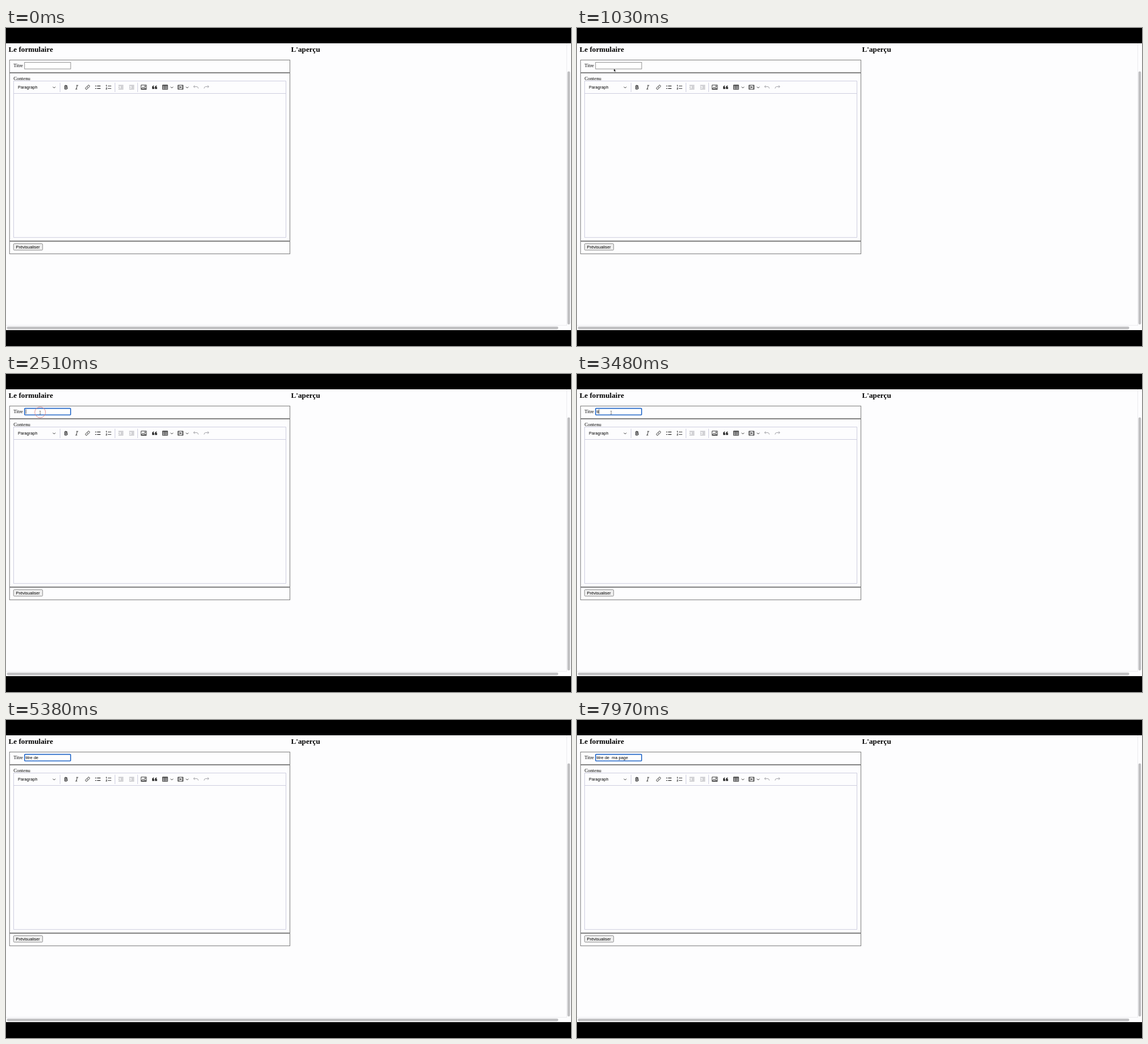
An HTML page for the animation above (8000 ms loop, 998 by 561 pixels).

```html
<!DOCTYPE html>
<html lang="fr">
<head>
<meta charset="utf-8">
<title>Formulaire</title>
<style>
  html, body { margin: 0; width: 100%; height: 100%; overflow: hidden; background: #000; }
  svg { display: block; width: 100%; height: 100%; }
  text { white-space: pre; fill: #000; }
  .serif { font: 8.8px "Liberation Serif", Times, serif; }
  .title { font: bold 13.2px "Liberation Serif", Times, serif; }
  .sans { font: 7.4px "Liberation Sans", Arial, sans-serif; }
  .box { fill: none; stroke: #858585; stroke-width: 1.1; }
  .rule { fill: none; stroke: #c9c9dc; stroke-width: .9; }
  .icon { fill: none; stroke: #2b2b2b; stroke-width: 1.7; }
  .pale { stroke: #9a9a9f; }
  .solid { fill: #2b2b2b; stroke: none; }
</style>
</head>
<body>
<svg viewBox="0 0 998 561">
  <rect width="998" height="561"/>
  <rect y="27" width="998" height="506" fill="#fdfdfe"/>

  <path d="M990.5 27V525M0 524.5H990" stroke="#ececef" fill="none"/>
  <rect x="991.7" y="76.5" width="4.6" height="446.5" rx="2.3" fill="#c0c0c2"/>
  <rect x="1.5" y="526.8" width="974" height="4.6" rx="2.3" fill="#c0c0c2"/>

  <text class="title" x="4.5" y="42">Le formulaire</text>
  <text class="title" x="503.5" y="42">L'aperçu</text>

  <rect class="box" x="6.3" y="56.5" width="495.2" height="22"/>
  <rect class="box" x="6.3" y="79.5" width="495.2" height="296"/>
  <rect class="box" x="6.3" y="376.6" width="495.2" height="21.8"/>

  <text class="serif" x="13.2" y="69">Titre</text>
  <rect id="field" x="32.8" y="60.6" width="81.4" height="11.6" fill="#fff" stroke="#858585" stroke-width=".9"/>
  <text id="typed" class="sans" x="34.6" y="68.8"></text>
  <rect id="caret" y="62.4" width=".7" height="8"/>

  <text class="serif" x="13.2" y="91.5">Contenu</text>
  <rect class="rule" x="13.5" y="93.6" width="481" height="275.8"/>
  <path class="rule" d="M13.5 115.5H494.5M95.5 96.5V113M192.5 96.5V113M232.5 96.5V113"/>
  <text class="sans" x="21" y="107.2">Paragraph</text>
  <g id="icons"></g>

  <rect x="13.3" y="380.5" width="51.4" height="11.4" rx="1.5" fill="#efefef" stroke="#808080" stroke-width=".9"/>
  <text class="sans" x="17.5" y="388.8">Prévisualiser</text>

  <g id="pointer">
    <circle id="ring" cy="-.4" r="9.5" fill="none" stroke="#dc8585" stroke-width=".9"/>
    <path id="arrow" d="M0 0V5.4L1.3 4.3 2.2 6.3 3.2 5.8 2.3 3.9H4Z" stroke="#fff" stroke-width=".5"/>
    <path id="beam" d="M-1.2 -2.8Q0 -2.8 0 -2V2.2Q0 3 -1.2 3M1.2 -2.8Q0 -2.8 0 -2M0 2.2Q0 3 1.2 3" fill="none" stroke="#555" stroke-width=".7"/>
  </g>
</svg>
<script>
  const LOOP = 8000, FOCUS = 2400, RING_END = 2750, HIDE = 4300;
  const TEXT = 'titre de  ma page';
  const KEYS = [3150, 3350, 3530, 3700, 3880, 4320, 4600, 4800, 5500, 5800,
                6100, 6300, 6550, 6800, 7000, 7220, 7400];
  // time, x, y
  const PATH = [[700, 110, 150], [1000, 65, 71.6], [1900, 65, 71.6], [2200, 60.3, 68], [LOOP, 60.3, 68]];

  // center x, path on a 20-unit grid, extra class
  const ICONS = [
    [106, 'M6.5 4.5V15.5H11a2.9 2.9 0 0 0 0-5.8H6.5M10.5 9.7a2.6 2.6 0 0 0 0-5.2H6.5', 'heavy'],
    [125, 'M8.5 4H14.5M5.5 16H11.5M11.5 4 8.5 16'],
    [144, 'M9 6.5 11.5 4a3.2 3.2 0 0 1 4.5 4.5L13 11.5a3.2 3.2 0 0 1-4.5 0M11 13.5 8.5 16A3.2 3.2 0 0 1 4 11.5L7 8.5a3.2 3.2 0 0 1 4.5 0'],
    [162, 'M8 6H19M8 14H19M2 6H5.5M2 14H5.5', 'bullets'],
    [181, 'M8 6H19M8 14H19M2 4 3.5 3V8M2 12H5L2 16.5H5.5'],
    [203, 'M2 4H18M9 8H18M9 12H18M2 16H18M6 7.5 2.5 10 6 12.5', 'pale'],
    [222, 'M2 4H18M9 8H18M9 12H18M2 16H18M2.5 7.5 6 10 2.5 12.5', 'pale'],
    [243.3, 'M1.5 3H18.5V17H1.5ZM3 15 7.5 9 11 13 13.5 11 17 15ZM13 6H15.5V8H13Z'],
    [262.5, 'M2 10Q2 5 8 4.5V7Q6 7.5 6 9.5H9V15.5H2ZM11 10Q11 5 17 4.5V7Q15 7.5 15 9.5H18V15.5H11Z', 'solid'],
    [281, 'M1.8 3H18.2V17H1.8ZM1.8 4.3H18.2M1.8 8H18.2M1.8 12.5H18.2M7.3 3V17M12.7 3V17'],
    [308.3, 'M1.5 3.5H18.5V16.5H1.5ZM4.5 3.5V16.5M15.5 3.5V16.5M8.5 7.5 12.5 10 8.5 12.5Z'],
    [335.5, 'M6 4 2.5 8 6 12M3 8H12.5Q17 8 17.5 14', 'pale'],
    [354, 'M14 4 17.5 8 14 12M17 8H7.5Q3 8 2.5 14', 'pale'],
    ...[85, 293, 320].map(x => [x, 'M6 8.5 10 12.5 14 8.5'])
  ];
  const WEIGHT = { heavy: 2.5, bullets: 2.1 };

  const $ = id => document.getElementById(id);
  const show = (id, on) => $(id).style.display = on ? '' : 'none';

  $('icons').innerHTML = ICONS.map(([x, d, kind = '']) =>
    `<path class="icon ${kind}" d="${d}" transform="translate(${x - 5.5} 99) scale(.55)"` +
    (WEIGHT[kind] ? ` style="stroke-width:${WEIGHT[kind]}"` : '') + '/>').join('');

  function position(t) {
    const i = PATH.findIndex(p => t < p[0]);
    if (i < 1) return PATH[0].slice(1);
    const [t0, x0, y0] = PATH[i - 1], [t1, x1, y1] = PATH[i];
    const k = (t - t0) / (t1 - t0), e = k * k * (3 - 2 * k);
    return [x0 + (x1 - x0) * e, y0 + (y1 - y0) * e];
  }

  function draw(t) {
    const focused = t >= FOCUS;
    const count = KEYS.filter(k => k <= t).length;
    const lastKey = count ? KEYS[count - 1] : FOCUS;
    const typed = $('typed'), field = $('field');

    typed.textContent = TEXT.slice(0, count);
    field.setAttribute('stroke', focused ? '#2468c8' : '#858585');
    field.setAttribute('stroke-width', focused ? 1.6 : .9);
    field.setAttribute('rx', focused ? 1.2 : 0);

    show('caret', focused && (t - lastKey) % 1000 < 500);
    $('caret').setAttribute('x', 34.8 + (count ? typed.getComputedTextLength() : 0));

    const [x, y] = position(t);
    $('pointer').setAttribute('transform', `translate(${x} ${y})`);
    show('pointer', t >= PATH[0][0] && t < HIDE);
    const inField = t >= 2050;
    show('arrow', !inField);
    show('beam', inField);
    show('ring', focused && t < RING_END);
  }

  const start = performance.now();
  function tick() {
    draw((performance.now() - start) % LOOP);
    requestAnimationFrame(tick);
  }
  tick();
</script>
</body>
</html>
```
